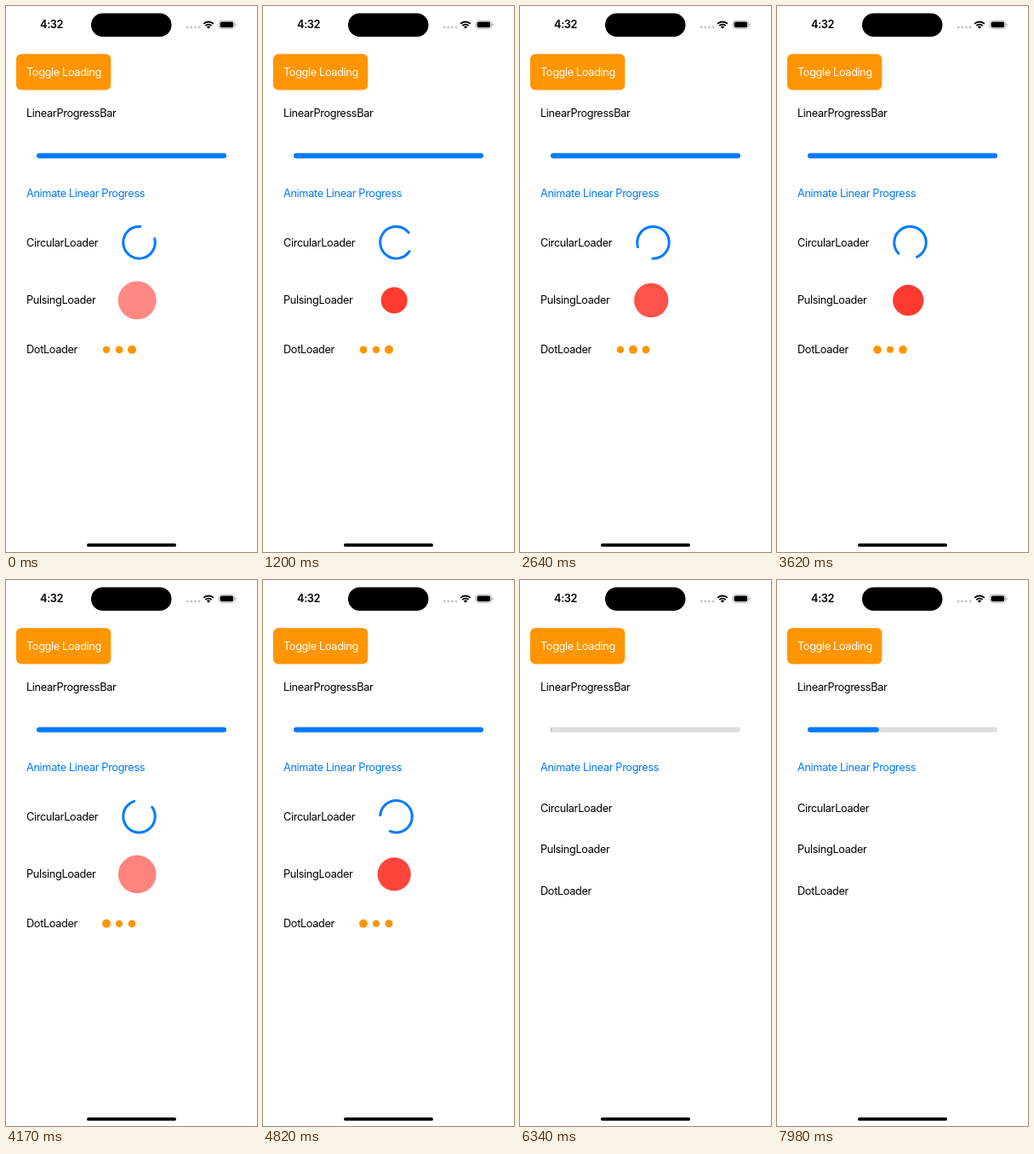
Animation of 295x640 px, one loop 8 s. Source, as an HTML page with a canvas:

```html
<!DOCTYPE html>
<html lang="en">
<head>
<meta charset="utf-8">
<title>Loaders</title>
<style>
html, body { margin: 0; width: 100%; height: 100%; overflow: hidden; background: #fff; }
canvas { position: absolute; left: 0; top: 0; width: 295px; height: 640px; }
div {
  position: absolute; left: 24px; white-space: nowrap; color: #000;
  font: 12.75px/20px Inter, "Liberation Sans", sans-serif; letter-spacing: -0.36px;
}
#time { left: 40px; top: 12px; font-weight: 600; }
#toggle { top: 67.7px; color: #fff; }
#animate { top: 209.5px; color: #007aff; }
</style>
</head>
<body>
<canvas id="stage"></canvas>
<div id="time">4:32</div>
<div id="toggle">Toggle Loading</div>
<div style="top:116px">LinearProgressBar</div>
<div id="animate">Animate Linear Progress</div>
<div class="row">CircularLoader</div>
<div class="row">PulsingLoader</div>
<div class="row">DotLoader</div>
<script>
const LOOP = 8000, HIDE = 5310, GROW = 7535, SECOND = 1059;
const BLUE = '#007aff', ORANGE = '#ff9500';
const ROWS_ON = [277.5, 345, 403], ROWS_OFF = [268, 316, 364.5];
const TAU = Math.PI * 2;

const canvas = document.getElementById('stage');
const rows = document.querySelectorAll('.row');
const ctx = canvas.getContext('2d');
const dpr = window.devicePixelRatio || 1;
canvas.width = 295 * dpr;
canvas.height = 640 * dpr;
ctx.scale(dpr, dpr);

const clamp = v => Math.min(1, Math.max(0, v));
const easeInOut = u => (1 - Math.cos(Math.PI * clamp(u))) / 2;

function pill(x, y, w, h, r, color) {
  ctx.fillStyle = color;
  ctx.beginPath();
  ctx.roundRect(x, y, w, h, r);
  ctx.fill();
}

function disc(x, y, r, color) {
  ctx.fillStyle = color;
  ctx.beginPath();
  ctx.arc(x, y, r, 0, TAU);
  ctx.fill();
}

function wifi(x, y) {
  const from = -Math.PI * 0.75, to = -Math.PI * 0.25;
  ctx.fillStyle = ctx.strokeStyle = '#000';
  ctx.lineWidth = 1.9;
  ctx.lineCap = 'butt';
  for (const r of [8.3, 5.2]) {
    ctx.beginPath();
    ctx.arc(x, y, r, from, to);
    ctx.stroke();
  }
  ctx.beginPath();
  ctx.moveTo(x, y);
  ctx.arc(x, y, 3.1, from, to);
  ctx.fill();
}

function battery() {
  ctx.strokeStyle = '#a6a6a6';
  ctx.lineWidth = 0.8;
  ctx.beginPath();
  ctx.roundRect(250.2, 17.2, 18.4, 9.4, 3);
  ctx.stroke();
  pill(251.6, 18.6, 15.6, 6.6, 1.9, '#000');
  pill(269.5, 20.4, 1.1, 3, 0.5, '#a6a6a6');
}

function chrome() {
  pill(100, 8.5, 94.5, 27.5, 13.75, '#000');
  for (let i = 0; i < 4; i++) disc(213.2 + i * 4.6, 25, 1.4, '#c4c4c6');
  wifi(238, 26.8);
  battery();
  pill(12, 56.3, 111.3, 42.2, 6, ORANGE);
  pill(95, 630, 105, 3.8, 1.9, '#000');
}

function progressAt(t) {
  return t < GROW ? 1 - easeInOut((t - HIDE) / SECOND) : easeInOut((t - GROW) / SECOND);
}

function bar(p) {
  const x = 36, y = 172.5, w = 223, h = 6;
  pill(x, y, w, h, 3, '#dedede');
  if (p * w > 0.3) pill(x, y, w * p, h, Math.min(3, w * p / 2), BLUE);
}

function spinner(t) {
  const start = (346 + t * 0.34) / 360 * TAU;
  ctx.strokeStyle = BLUE;
  ctx.lineWidth = 3;
  ctx.lineCap = 'round';
  ctx.beginPath();
  ctx.arc(156.5, 277.2, 18.75, start, start + TAU * 0.8);
  ctx.stroke();
}

function pulse(t) {
  // triangle wave peaking at 60 ms
  const cycle = ((t - 60) / (2 * SECOND) % 1 + 1) % 1;
  const u = Math.abs(1 - 2 * cycle);
  const s = easeInOut(u) / 2 + Math.sin(u * Math.PI / 2) / 2;
  ctx.globalAlpha = clamp(1.5 - 0.9 * s);
  disc(154.2, 344.9, 15 + 7.5 * s, '#ff3b30');
  ctx.globalAlpha = 1;
}

function dots(t) {
  for (let i = 0; i < 3; i++) {
    const phase = 0.375 + t / 625 + i / 3;
    disc(118 + i * 15, 402.8, 4.5 + 0.5 * Math.cos(phase * TAU), ORANGE);
  }
}

function draw(now) {
  const t = now % LOOP;
  const loading = t < HIDE;
  ctx.clearRect(0, 0, 295, 640);
  chrome();
  bar(progressAt(t));
  if (loading) {
    spinner(t);
    pulse(t);
    dots(t);
  }
  const ys = loading ? ROWS_ON : ROWS_OFF;
  rows.forEach((row, i) => { row.style.top = ys[i] - 10 + 'px'; });
}

let begin;
function tick(now) {
  begin ??= now;
  draw(now - begin);
  requestAnimationFrame(tick);
}
draw(0);
requestAnimationFrame(tick);
</script>
</body>
</html>
```
